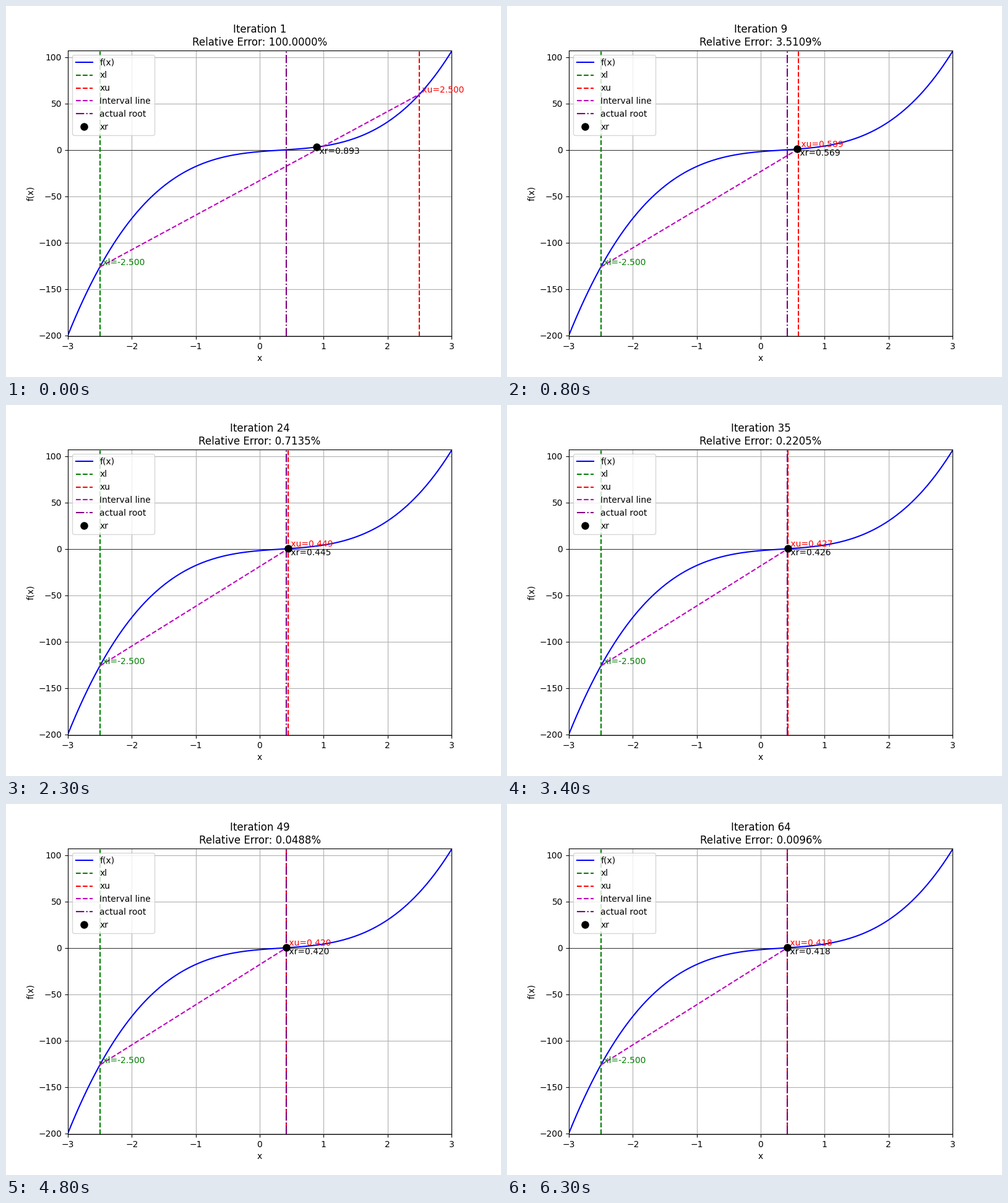
A matplotlib script for the animation above (6.4 s loop, 800x600 px).

```python
import numpy as np
import matplotlib.pyplot as plt
from matplotlib.animation import FuncAnimation

STEPS = 64
XL, XU = -2.5, 2.5


def f(x):
    return 5 * x**3 - 5 * x**2 + 6 * x - 2


def false_position(lo, hi, steps):
    """Return (lo, hi, estimate, relative error in percent) for each step."""
    rows = []
    prev = None
    for _ in range(steps):
        xr = hi - f(hi) * (lo - hi) / (f(lo) - f(hi))
        error = 100.0 if prev is None else abs((xr - prev) / xr) * 100
        rows.append((lo, hi, xr, error))
        if f(lo) * f(xr) < 0:
            hi = xr
        else:
            lo = xr
        prev = xr
    return rows


def actual_root():
    roots = np.roots([5, -5, 6, -2])
    return roots[np.argmin(abs(roots.imag))].real


rows = false_position(XL, XU, STEPS)

fig, ax = plt.subplots(figsize=(8, 6), dpi=100)
xs = np.linspace(-3, 3, 400)
ax.axhline(0, color="k", lw=0.5)
ax.plot(xs, f(xs), "b-", label="f(x)")
xl_line = ax.axvline(XL, color="g", ls="--", label="xl")
xu_line = ax.axvline(XU, color="r", ls="--", label="xu")
chord, = ax.plot([], [], "m--", label="Interval line")
ax.axvline(actual_root(), color="purple", ls="-.", label="actual root")
dot, = ax.plot([], [], "ko", ms=8, label="xr")

xl_text = ax.text(0, 0, "", color="g", va="bottom")
xu_text = ax.text(0, 0, "", color="r", va="bottom")
xr_text = ax.text(0, 0, "", color="k", va="top")

ax.set_xlim(-3, 3)
ax.set_ylim(f(-3) - 1, f(3) + 1)
ax.set_xlabel("x")
ax.set_ylabel("f(x)")
ax.grid(True)
ax.legend(loc="upper left")


def put_label(text, name, x):
    text.set_position((x, f(x)))
    text.set_text(f" {name}={x:.3f}")


def update(i):
    lo, hi, xr, error = rows[i]
    xl_line.set_xdata([lo, lo])
    xu_line.set_xdata([hi, hi])
    chord.set_data([lo, hi], [f(lo), f(hi)])
    dot.set_data([xr], [f(xr)])
    put_label(xl_text, "xl", lo)
    put_label(xu_text, "xu", hi)
    put_label(xr_text, "xr", xr)
    ax.set_title(f"Iteration {i + 1}\nRelative Error: {error:.4f}%")
    return []


anim = FuncAnimation(fig, update, frames=STEPS, interval=100, repeat=True,
                     repeat_delay=0, blit=False)
plt.show()
```
